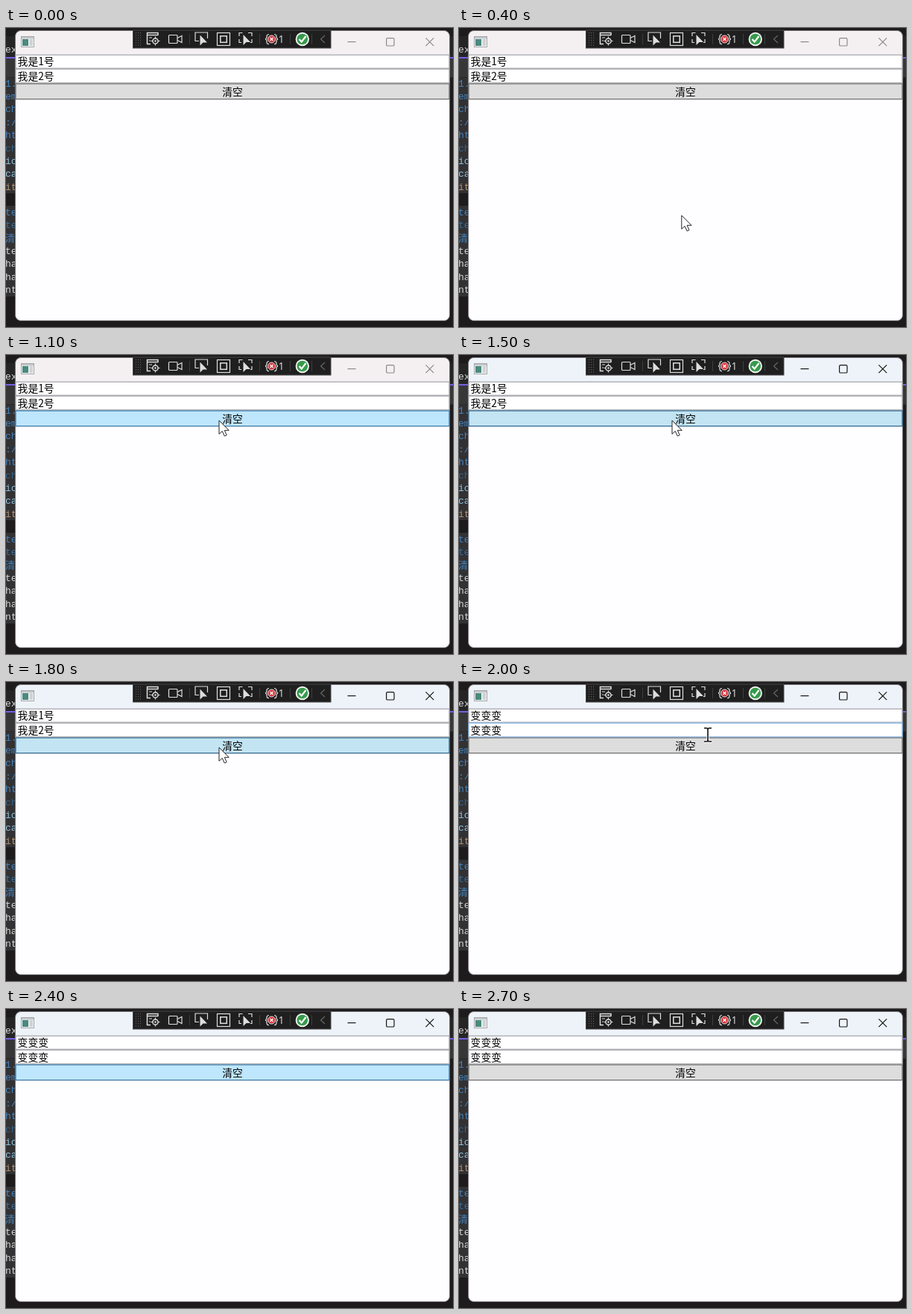
Animation of 600 by 402 pixels, one loop 3600 ms. Source, as an HTML page:

```html
<!DOCTYPE html>
<html lang="zh-CN">
<head>
<meta charset="utf-8">
<title>清空</title>
<style>
html, body { margin: 0; width: 100%; height: 100%; overflow: hidden; background: #1d1b1c; }
svg { display: block; width: 600px; height: 402px; }
.ui { font: 13.8px "Noto Sans CJK SC", "Noto Sans CJK", sans-serif; fill: #000; }
.code { font: 13px "Liberation Mono", "Noto Sans CJK SC", monospace; }
.line { fill: none; stroke: #dedede; stroke-width: 1.2; }
.solid { fill: #dedede; stroke: none; }
</style>
</head>
<body>
<svg viewBox="0 0 600 402" xmlns="http://www.w3.org/2000/svg">
  <rect width="600" height="402" fill="#1d1b1c"/>
  <rect y="11" width="600" height="28" fill="#262526"/>
  <rect y="39" width="600" height="2.3" fill="#7160e0"/>
  <rect y="41.5" width="600" height="25" fill="#383738"/>
  <rect y="67" width="14" height="155" fill="#323133"/>
  <rect y="239" width="14" height="122" fill="#323133"/>
  <g id="code" class="code"></g>

  <rect x="12.5" y="3.5" width="583" height="390" rx="7.5" fill="#fefdff"/>
  <path id="title" d="M12.500 36V11a7.500 7.500 0 0 1 7.500-7.500H588a7.500 7.500 0 0 1 7.500 7.500V36Z"/>
  <rect x="12.5" y="3.5" width="583" height="390" rx="7.5" fill="none" stroke="#777579"/>
  <g>
    <rect x="20.5" y="11.5" width="17" height="14" fill="#f5f5f5" stroke="#a3a6a9"/>
    <rect x="21" y="12" width="16" height="2.5" fill="#c3c7ca"/>
    <rect x="22" y="15" width="8" height="9" fill="#4a8a80"/>
    <rect x="31.5" y="15" width="4.5" height="9" fill="#d0d3d5"/>
  </g>
  <g id="caption" fill="none" stroke-width="1.2">
    <path d="M458.500 18.600H469.500"/>
    <rect x="510.6" y="13.6" width="10.4" height="10.4" rx="1.6"/>
    <path d="M563.400 13.400l10.800 10.800M574.200 13.400l-10.800 10.800"/>
  </g>

  <g id="fields"></g>
  <rect id="btn" x="13" y="75" width="582" height="20.6" stroke-width="1.2"/>
  <text class="ui" x="304" y="91" text-anchor="middle">清空</text>

  <rect x="170.5" y="3" width="265.5" height="24" fill="#1f1f1f" stroke="#48474a"/>
  <g id="grip" fill="#727173"></g>
  <path d="M246.500 8V22M340.500 8V22M381.500 8V22M410.500 8V22" stroke="#3e3d40"/>
  <g class="line">
    <path d="M194 21.500H189.500V6.500H204V10M189.500 9.500H204" stroke-width="1.5"/>
    <path d="M192 13H196M192 17H194"/>
    <circle cx="200.5" cy="17.5" r="3.6" stroke-width="1.5"/>
    <circle cx="200.5" cy="17.5" r="1.3" class="solid"/>
    <path d="M200.500 11.500V14M200.500 21V23.500M194.500 17.500H197M204 17.500H206.500"/>
    <rect x="218.5" y="9.5" width="11.5" height="11" rx="1"/>
    <path d="M230 13.500L236 10.500V19.500L230 16.500"/>
    <path d="M259 17.500H254V6H270.500V14"/>
    <path class="solid" d="M260.500 9.500V23.500L264.500 19.500H270Z"/>
    <rect x="283.5" y="6.5" width="17" height="17"/>
    <rect x="287.8" y="10.800" width="8.500" height="8.500" stroke-width="1.500"/>
    <path d="M313 11V6.500H317.500M325 6.500H330V11M313 15V19.500H316M330 15V19.500H328"/>
    <path class="solid" d="M318.500 9V23L322.500 19H328Z"/>
  </g>
  <path class="line" d="M353 8.500Q350 8.500 350 11.500T348 15Q350 15 350 18.500T353 21.500M360 8.500Q363 8.500 363 11.500T365 15Q363 15 363 18.500T360 21.500"/>
  <circle cx="356.500" cy="15" r="5" fill="#d8333a" stroke="#f3e4e5"/>
  <path d="M354.500 13l4 4M358.500 13l-4 4" stroke="#fff" stroke-width="1.400"/>
  <text x="365.500" y="20" fill="#ddd" font-family="Open Sans, sans-serif" font-size="14">1</text>
  <circle cx="397.800" cy="15" r="9.200" fill="#eef3ee"/>
  <circle cx="397.800" cy="15" r="7.300" fill="#379a4c"/>
  <path d="M393.500 15l3.200 3.600L402.500 11" fill="none" stroke="#fff" stroke-width="2.200"/>
  <path d="M428 10l-5.500 5 5.500 5" fill="none" stroke="#69686b" stroke-width="1.100"/>

  <path id="arrow" d="M0 0V18.300L4.300 14.400L7.300 21L10.200 19.700L7.300 13.300H13.200Z" fill="#fff" stroke="#222" stroke-width="1"/>
  <g id="beam" fill="none">
    <path id="stem" d="M-5 -9H-2Q0 -9 0 -7Q0 -9 2 -9H5M0 -7V7M-5 9H-2Q0 9 0 7Q0 9 2 9H5" stroke="#fff" stroke-width="3.400"/>
    <path d="M-5 -9H-2Q0 -9 0 -7Q0 -9 2 -9H5M0 -7V7M-5 9H-2Q0 9 0 7Q0 9 2 9H5" stroke="#111" stroke-width="1.600"/>
  </g>
</svg>
<script>
const LOOP = 3600, STEP = 100;
const $ = id => document.getElementById(id);
const set = (el, attrs) => { for (const k in attrs) el.setAttribute(k, attrs[k]); };

function add(parent, tag, attrs, text) {
  const el = document.createElementNS("http://www.w3.org/2000/svg", tag);
  set(el, attrs);
  if (text) el.textContent = text;
  return parent.appendChild(el);
}

const blue = "#4383bd", pale = "#8fc3e2", white = "#d6d6d6";
[
  ["ex", 33, white], ["1.", 79, blue], ["em", 96, blue], ["ch", 113, blue],
  [":/", 131, blue], ["ht", 148, blue], ["ch", 166, "#356388"], ["ic", 183, pale],
  ["ca", 200, pale], ["it", 218, "#b8936f"], ["te", 252, blue], ["te", 269, "#376f9e"],
  ["清", 287, blue], ["te", 304, white], ["ha", 321, white], ["ha", 339, white], ["nt", 356, white]
].forEach(([s, y, fill]) => add($("code"), "text", { x: -1, y, fill }, s));

for (let i = 0; i < 18; i++)
  add($("grip"), "rect", { x: 174 + i % 3 * 3, y: 6 + Math.floor(i / 3) * 3.3, width: 1, height: 1 });

function field(y, height, base) {
  const edge = add($("fields"), "rect", { x: 13, y, width: 582, height, fill: "#fff", "stroke-width": 1.2 });
  return { edge, label: add($("fields"), "text", { class: "ui", x: 15.6, y: base }) };
}
const fields = [field(36.2, 18, 50), field(55.2, 18.6, 70.4)];

const buttonLook = {
  normal: { fill: "#dddddd", stroke: "#6c6c6c" },
  hover: { fill: "#bee6fd", stroke: "#3874a3" },
  pressed: { fill: "#c2e4f3", stroke: "#2c628b" }
};

// Pointer path: time, x, y
const path = [
  [100, 312, 330], [600, 290, 200], [700, 282, 112], [1100, 286, 88],
  [1900, 286, 88], [2000, 334, 71], [2100, 334, 71], [2300, 330, 90], [2400, 330, 90]
];

function pointer(t) {
  const i = path.findIndex(p => p[0] > t);
  if (i < 1) return null;
  const [t0, x0, y0] = path[i - 1], [t1, x1, y1] = path[i];
  const k = (t - t0) / (t1 - t0);
  return { x: x0 + (x1 - x0) * k, y: y0 + (y1 - y0) * k };
}

function place(el, p) {
  set(el, p ? { visibility: "visible", transform: `translate(${p.x} ${p.y})` } : { visibility: "hidden" });
}

function draw(ms) {
  const t = Math.floor(ms % LOOP / STEP) * STEP;
  const p = pointer(t);
  const active = t >= 1300, changed = t >= 1900;
  const inField = p && p.y >= 55 && p.y < 75;
  const over = t === 2400 || p && p.y >= 75 && p.y < 96;
  const state = !over ? "normal" : active && !changed ? "pressed" : "hover";

  set($("title"), { fill: active ? "#eef3f9" : "#f4f0f2" });
  set($("caption"), { stroke: active ? "#151515" : "#8c898b" });
  set($("btn"), buttonLook[state]);
  fields.forEach((f, i) => {
    f.label.textContent = changed ? "变变变" : `我是${i + 1}号`;
    set(f.edge, { stroke: i && inField ? "#7eb4ea" : "#a2a4a9" });
  });
  place($("arrow"), inField ? null : p);
  place($("beam"), inField ? p : null);
}

const start = performance.now();
function tick() {
  draw(performance.now() - start);
  requestAnimationFrame(tick);
}
draw(0);
requestAnimationFrame(tick);
</script>
</body>
</html>
```
